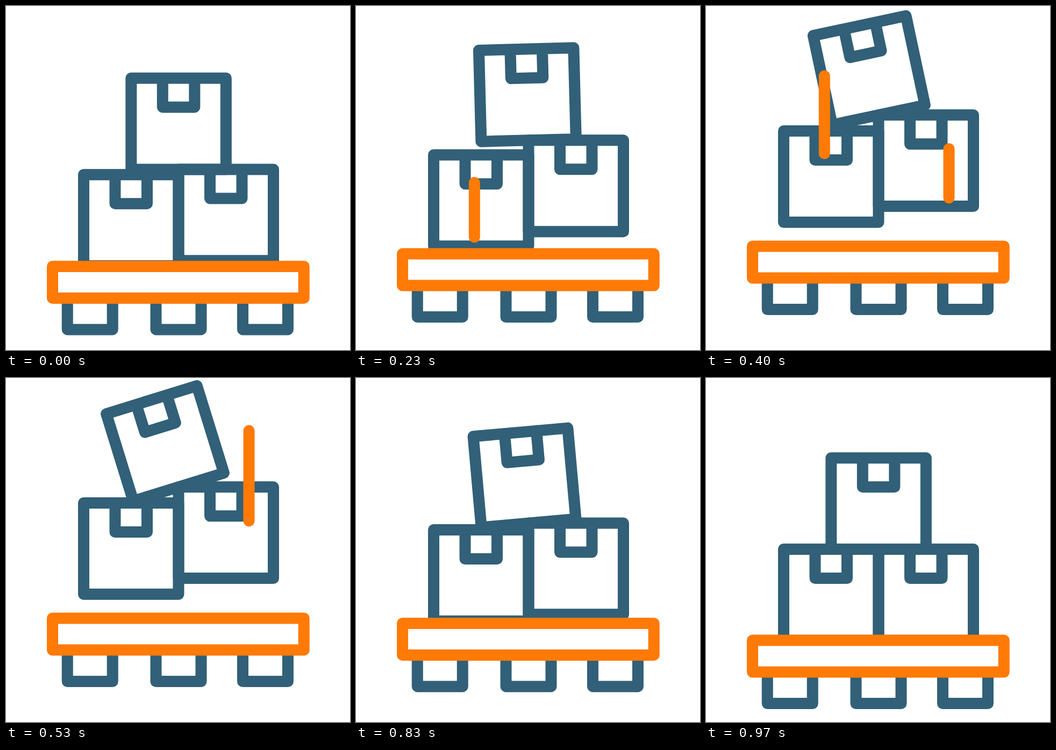
Write an HTML page that moves like this. It is 640 px wide and 640 px high and loops after 1.67 s.

```html
<!DOCTYPE html>
<html lang="en">
<head>
<meta charset="utf-8">
<title>Boxes on a pallet</title>
<style>
html, body { margin: 0; height: 100%; overflow: hidden; background: #fff; }
svg { display: block; width: 100%; height: 100%; }
g, path { fill: none; stroke: #316078; stroke-width: 21; stroke-linecap: round; stroke-linejoin: round; }
.orange { stroke: #ff7a06; }
.deck { fill: #fff; }
</style>
</head>
<body>
<svg viewBox="0 0 640 640">
  <defs>
    <path id="box" d="M-88.25 0v-169.8h176.5v169.8zM-29.75-169.8v54h59.5v-54"/>
    <path id="foot" d="M-42 547v58.5h84v-58.5"/>
  </defs>
  <use id="left" href="#box"/>
  <use id="right" href="#box"/>
  <use id="top" href="#box"/>
  <g id="pallet">
    <use href="#foot" x="156.25"/>
    <use href="#foot" x="321"/>
    <use href="#foot" x="482.5"/>
    <path class="orange deck" d="M86.5 488h467.75v59h-467.75z"/>
  </g>
  <path id="line1" class="orange"/>
  <path id="line2" class="orange"/>
</svg>
<script>
const LOOP = 1670, FPS = 30, FIRST = -1, LAST = 24;
const $ = id => document.getElementById(id);

function smooth(x) {
  const u = Math.min(1, Math.max(0, x));
  return u * u * (3 - 2 * u);
}

// Eases from 0 to 1 between steps a and b
const ease = (n, a, b) => smooth((n - a) / (b - a));

// Rises to 1, holds, and falls back; everything rests on the last step
const swell = (n, up, upEnd, down, downEnd) =>
  n < LAST ? ease(n, up, upEnd) - ease(n, down, downEnd) : 0;

// A streak that grows upwards, then shrinks towards its upper end
function streak(id, x, base, length, n) {
  const head = length * ease(n, -1.2, 7);
  const tail = length * ease(n, 2.8, 11);
  const shown = n > -1 && head > tail;
  $(id).setAttribute("d", shown ? `M${x} ${base - tail}V${base - head}` : "");
}

function place(id, x, y, angle = 0) {
  $(id).setAttribute("transform", `translate(${x} ${y}) rotate(${angle})`);
}

function draw(ms) {
  const step = Math.floor((ms % LOOP + 3.4) * FPS / 1000) - 5;
  const n = Math.min(LAST, Math.max(FIRST, step));

  const pallet = 41 * swell(n, -2.3, 4.8, 18.2, 24);
  const left = 86 * swell(n, -2.25, 6.45, 14.4, 24.5);
  const right = 115.7 * swell(n, -2.95, 5.85, 14.4, 24.5);
  const tilt = 17.2 * swell(n, 0, 11, 11.5, 24.8);

  place("pallet", 0, -pallet);
  place("left", 232.75, 488.3 - left);
  place("right", 409.25, 488.3 - right);
  place("top", 321.1, 318.5 - right, -tilt);
  streak("line1", 220.3, 430, 300, n);
  streak("line2", 452, 357, 270, n - 5);
}

const start = performance.now();
function tick() {
  draw(performance.now() - start);
  requestAnimationFrame(tick);
}
tick();
</script>
</body>
</html>
```
